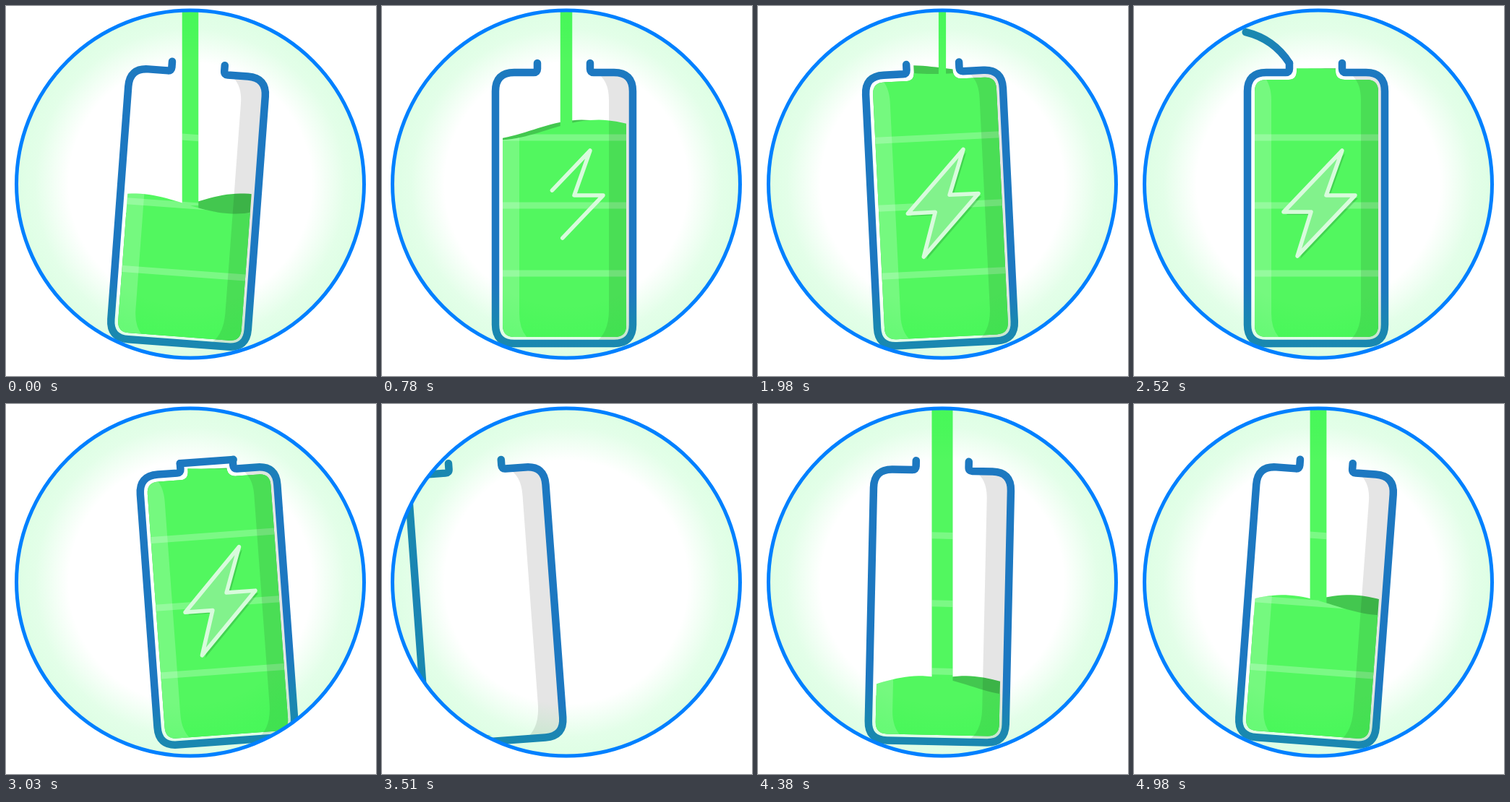
An HTML page with a canvas for the animation above (5010 ms loop, 512 by 512 pixels).

```html
<!DOCTYPE html>
<html lang="en">
<head>
<meta charset="utf-8">
<title>Charging battery</title>
<style>
  html, body { margin: 0; width: 100%; height: 100%; overflow: hidden; background: #fff; }
  canvas { display: block; width: 512px; height: 512px; }
</style>
</head>
<body>
<canvas id="stage" width="512" height="512"></canvas>
<script>
const ctx = document.getElementById('stage').getContext('2d');
const LOOP = 5010, SWAP = 3300;           // one loop; moment the empty battery follows the full one
const FILL = -920, STOP = 2000;           // liquid starts rising / stream is cut
const CX = 252.5, CY = 280;               // pivot of the battery
const BLUE = '#1d78c1', GREEN = '#52f75f', DARK = '#43c74f';

const shell = new Path2D('M215 79V87Q215 92 210 92H183Q157 92 157 118V441Q157 467 183 467H321Q347 467 347 441V118Q347 92 321 92H293Q288 92 288 87V79');
const hollow = new Path2D('M183 92H321Q347 92 347 118V441Q347 467 321 467H183Q157 467 157 441V118Q157 92 183 92Z');
const tank = new Path2D('M167 118Q167 102 183 102H214Q225 102 225 90V80H279V90Q279 102 292 102H322Q338 102 338 118V442Q338 458 322 458H183Q167 458 167 442Z');
const shade = new Path2D('M296 92Q314 102 314 130V420Q314 454 293 467H348V92Z');
const shine = new Path2D('M160 95H178Q190 108 190 130V425Q190 448 202 460H160Z');
const bolt = new Path2D('M207 285L288 200L266 262H306L226 346L245 285Z');
const BOLT_LENGTH = 441, BOLT_MIDDLE = 173;

const clamp = v => Math.min(1, Math.max(0, v));
const ramp = (t, a, b) => clamp((t - a) / (b - a));
const smooth = (t, a, b) => { const u = ramp(t, a, b); return u * u * (3 - 2 * u); };

function scoped(draw) {
  ctx.save();
  draw();
  ctx.restore();
}

function pose(t) {
  if (t > 2780) {
    return { x: 360 * ramp(t, 2780, SWAP) ** 3, tilt: -4.2 * smooth(t, 2780, 3030) };
  }
  return {
    x: t < 0 ? -109 * Math.exp(-(t + 1500) / 170) : 0,
    tilt: t < 2340 ? 4.25 * Math.cos(2 * Math.PI * t / 3120) : 0
  };
}

function place({ x, tilt }) {
  ctx.translate(CX + x, CY);
  ctx.rotate(tilt * Math.PI / 180);
  ctx.translate(-CX, -CY);
}

// Two waves run against each other over a rising level.
function surfaces(t) {
  const u = Math.max(0, t - FILL);
  const level = Math.max(88, 458 - 500 * (1 - Math.exp(-u / 2000)));
  const swell = 14 * smooth(t, FILL, FILL + 200) * (1 - 0.87 * smooth(t, 1500, 2300));
  const wave = peak => x => level - swell * Math.cos(2 * Math.PI * (x - peak) / 280);
  return {
    front: wave(178 - 0.945 * t + 0.00003 * t * t),
    back: wave(325 + 0.98 * t + 0.000045 * t * t)
  };
}

function below(surface) {
  const p = new Path2D();
  for (let x = 0; x <= 900; x += 6) p.lineTo(x, surface(x));
  p.lineTo(900, 512);
  p.lineTo(0, 512);
  return p;
}

function fill(path, color) {
  ctx.fillStyle = color;
  ctx.fill(path);
}

function drawMarks() {
  ctx.fillStyle = 'rgba(255,255,255,.24)';
  for (const y of [182, 276, 370]) ctx.fillRect(160, y - 4.5, 185, 9);
}

function drawStream(t, at, front) {
  const surface = front(255);
  const top = 90 * ramp(t, STOP, STOP + 80);
  const end = Math.min(surface, 9 + 450 * ramp(t, FILL - 150, FILL) ** 1.5);
  if (t < FILL - 150 || top >= end) return;
  const width = 32.3 * Math.exp(-(t + 900) / 2500);
  ctx.fillStyle = GREEN;
  ctx.fillRect(255 - width / 2, top, width, end - top + (end === surface ? 8 : 0));
  scoped(() => {
    ctx.beginPath();
    ctx.rect(255 - width / 2, top, width, end - top);
    ctx.clip();
    place(at);
    drawMarks();
  });
}

function drawLiquid(t, at, { front, back }) {
  // The clip follows the battery while the surface stays level in the stage.
  const inTank = draw => scoped(() => {
    place(at);
    ctx.clip(tank);
    ctx.setTransform(1, 0, 0, 1, 0, 0);
    draw();
  });
  inTank(() => fill(below(back), DARK));
  drawStream(t, at, front);
  inTank(() => {
    const body = below(front);
    fill(body, GREEN);
    ctx.clip(body);
    place(at);
    drawMarks();
    fill(shine, 'rgba(255,255,255,.2)');
  });
}

function drawBolt(t) {
  const half = BOLT_LENGTH / 2 * smooth(t, 470, 1020);
  if (half <= 0) return;
  const body = smooth(t, 1000, 1200);
  scoped(() => {
    ctx.translate(4, 4);
    fill(bolt, `rgba(0,70,20,${0.2 * body})`);
  });
  fill(bolt, `rgba(130,242,140,${body})`);
  ctx.strokeStyle = '#d8fbdc';
  ctx.lineWidth = 5.5;
  if (half < BOLT_LENGTH / 2) {
    ctx.setLineDash([2 * half, BOLT_LENGTH - 2 * half]);
    ctx.lineDashOffset = half - BOLT_MIDDLE;
  }
  ctx.stroke(bolt);
  ctx.setLineDash([]);
}

// The lid grows out to the left, then whips over the neck.
function drawLid(t) {
  const size = 74 * smooth(t, 2350, 2480);
  if (size <= 0) return;
  const swing = smooth(t, 2430, 2750);
  const angle = Math.PI * (1 + swing);
  const bend = 15 * Math.sin(Math.PI * Math.sqrt(swing));
  const c = Math.cos(angle), s = Math.sin(angle);
  ctx.beginPath();
  ctx.moveTo(215, 79);
  ctx.quadraticCurveTo(215 + c * size / 2 - s * bend, 79 + s * size / 2 + c * bend,
    215 + c * size, 79 + s * size);
  ctx.stroke();
}

function drawBattery(t, at) {
  scoped(() => {
    place(at);
    scoped(() => {
      ctx.clip(hollow);
      fill(shade, 'rgba(0,0,0,.1)');
    });
    drawBolt(t);
    ctx.strokeStyle = BLUE;
    ctx.lineWidth = 10.5;
    ctx.stroke(shell);
    drawLid(t);
  });
}

const glow = ctx.createRadialGradient(255, 246.5, 168, 255, 246.5, 240);
glow.addColorStop(0, 'rgba(0,250,50,0)');
glow.addColorStop(0.65, 'rgba(0,250,50,.11)');
glow.addColorStop(1, 'rgba(0,250,50,.13)');

function draw(now) {
  const time = now % LOOP;
  const t = time >= SWAP ? time - LOOP : time;
  const at = pose(t);
  ctx.lineCap = ctx.lineJoin = 'round';
  ctx.fillStyle = '#fff';
  ctx.fillRect(0, 0, 512, 512);

  const disc = new Path2D();
  disc.arc(255, 246.5, 240.5, 0, 2 * Math.PI);
  scoped(() => {
    ctx.clip(disc);
    const { front, back } = surfaces(t);
    // While the full battery leaves, the liquid moves along with it.
    const shift = t > 2780 ? at.x : 0;
    drawLiquid(t, at, { front: x => front(x - shift), back: x => back(x - shift) });
    drawBattery(t, at);
    fill(disc, glow);
  });
  ctx.strokeStyle = '#0080ff';
  ctx.lineWidth = 5;
  ctx.stroke(disc);
}

const start = performance.now();
function tick() {
  draw(performance.now() - start);
  requestAnimationFrame(tick);
}
tick();
</script>
</body>
</html>
```
